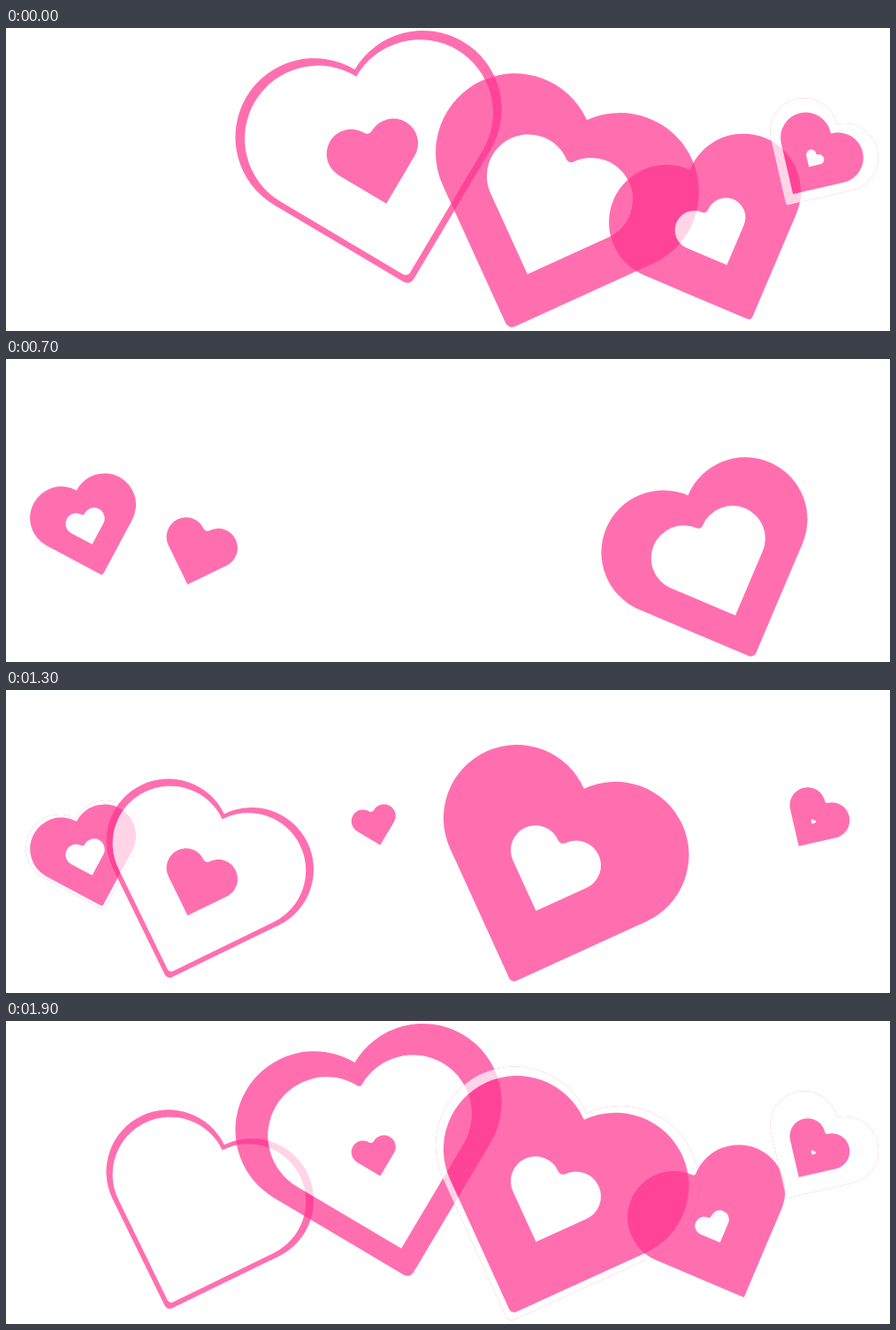
Recreate the animation shown at these times as an HTML page. Size 1000 px wide and 343 px high, loop 2 s.

```html
<!DOCTYPE html>
<html lang="en">
<head>
<meta charset="utf-8">
<title>Hearts</title>
<style>
  html, body { margin: 0; width: 100%; height: 100%; overflow: hidden; background: #fff; }
  svg { display: block; width: 1000px; height: 343px; }
</style>
</head>
<body>
<svg viewBox="0 0 1000 343"></svg>
<script>
const STEP = 100, STEPS = 20, LIFE = 16, LAYER_GAP = 3;
const COLORS = ['#ff338f', '#fff', '#ff338f', '#fff'];
const NS = 'http://www.w3.org/2000/svg';

// Growth stages: half distance of the lobes, lobe radius, notch radius, tip radius
const STAGES = [
  [3.2, 3.5, 0.9, 0],
  [12.2, 13.2, 3.7, 0],
  [24.5, 28, 6.1, 0],
  [37.8, 47, 5.7, 0],
  [50.3, 66.6, 3.5, 0.5],
  [59.5, 82.8, 0, 6],
  [63.4, 89.2, 0, 8]
];
const FULL = STAGES[STAGES.length - 1][0];

// x, y: lobe midpoint at full size; cx, cy: point the heart grows from
const HEARTS = [
  { start: 1,  size: 0.429, angle: -17,   x: 86.8,  y: 171.2, cx: 91.2,  cy: 191.2 },
  { start: 4,  size: 0.786, angle: 19,    x: 230.8, y: 186.9, cx: 216.1, cy: 220.6 },
  { start: 11, size: 1,     angle: -14.3, x: 410.1, y: 107.8, cx: 417.1, cy: 154.6 },
  { start: 7,  size: 1.002, angle: 20.5,  x: 635,   y: 163.2, cx: 613.8, cy: 206.8 },
  { start: 14, size: 0.787, angle: -22,   x: 790,   y: 200.2, cx: 800.7, cy: 235 },
  { start: 9,  size: 0.429, angle: 32,    x: 925.7, y: 131.9, cx: 912.8, cy: 149.3 }
];

// Two round lobes over a right-angled tip, origin midway between the lobes
function heartPath([h, r, notch, tip]) {
  const q = r * Math.SQRT1_2, e = tip * Math.SQRT1_2;
  const end = h + r * Math.SQRT2;
  const f = notch / (r + notch);
  const nx = h * f, ny = -Math.sqrt((r + notch) ** 2 - h * h) * (1 - f);
  const arc = (rad, sweep, x, y) => `A${rad} ${rad} 0 0 ${sweep} ${x} ${y}`;
  return `M${-nx} ${ny}` + arc(notch, 0, nx, ny) +
    arc(r, 1, h + q, -q) + arc(r, 1, h + q, q) +
    `L${e} ${end - e}` + arc(tip, 1, -e, end - e) +
    `L${-h - q} ${q}` + arc(r, 1, -h - q, -q) + arc(r, 1, -nx, ny) + 'Z';
}

function add(parent, name, attrs) {
  const el = document.createElementNS(NS, name);
  for (const key in attrs) el.setAttribute(key, attrs[key]);
  return parent.appendChild(el);
}

const svg = document.querySelector('svg');
const paths = STAGES.map(heartPath);
for (const heart of HEARTS) {
  const group = add(svg, 'g', { opacity: 0.7 });
  heart.layers = COLORS.map(fill => add(group, 'path', { fill }));
}

function place(el, heart, stage) {
  const s = STAGES[stage][0] / FULL;
  const x = heart.cx + s * (heart.x - heart.cx);
  const y = heart.cy + s * (heart.y - heart.cy);
  el.setAttribute('d', paths[stage]);
  el.setAttribute('transform', `translate(${x} ${y}) rotate(${heart.angle}) scale(${heart.size})`);
}

function draw(step) {
  for (const heart of HEARTS) {
    const age = (step - heart.start + STEPS) % STEPS;
    heart.layers.forEach((el, i) => {
      const stage = Math.min(age - i * LAYER_GAP, STAGES.length) - 1;
      const shown = age < LIFE && stage >= 0;
      el.setAttribute('display', shown ? 'inline' : 'none');
      if (shown) place(el, heart, stage);
    });
  }
}

const begin = performance.now();
let last = -1;
function tick() {
  const step = Math.floor((performance.now() - begin) / STEP) % STEPS;
  if (step !== last) draw(last = step);
  requestAnimationFrame(tick);
}
tick();
</script>
</body>
</html>
```
